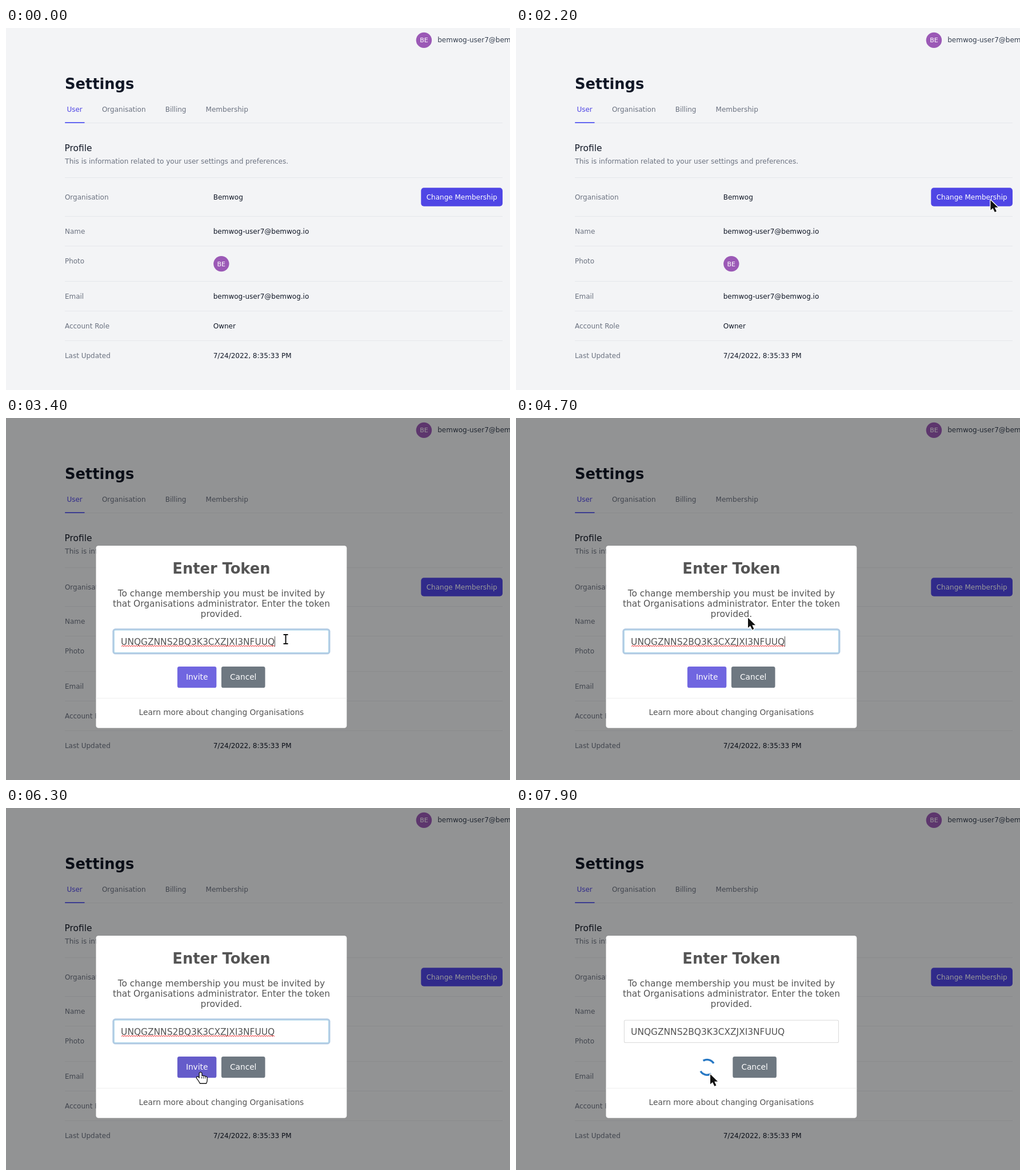
Recreate the animation shown at these times as an HTML page with a canvas. Size 882x635 px, loop 8 s.

```html
<!DOCTYPE html>
<html lang="en">
<head>
<meta charset="utf-8">
<title>Change membership</title>
<style>
  html, body { margin: 0; width: 100%; height: 100%; overflow: hidden; background: #f3f4f6; }
  canvas { display: block; }
</style>
</head>
<body>
<canvas id="stage" width="882" height="635"></canvas>
<script>
const ctx = document.getElementById('stage').getContext('2d');
const LOOP = 8000, STEP = 100;
const OPEN = 2232, PASTE = 3300, PRESS = 6900, LOADING = 7092;
const EMAIL = 'bemwog-user7@bemwog.io';
const TOKEN = 'UNQGZNNS2BQ3K3CXZJXI3NFUUQ';
const MODAL = { x: 157.5, y: 224, w: 438.8, h: 319.7 };
const CENTER = { x: 376.9, y: 383.9 };
const CHANGE = { x: 726.3, y: 280.3, w: 142.7, h: 32.5 };
const INPUT = { x: 188.9, y: 371.7, w: 376, h: 40.3 };
const INVITE = { x: 299.9, y: 436, w: 68.4, h: 37.3 };
const LAST_LINE = { x: 341, y: 335, w: 60, h: 18 };

// Pointer path: time, x, y
const PATH = [
  [600, 180, 28], [700, 450, 130], [800, 690, 240], [900, 805, 296], [1000, 830, 313.5],
  [1200, 830, 313.5], [1300, 830, 308], [1400, 829, 304], [2000, 829, 304], [2100, 830.5, 302],
  [2300, 830.5, 302], [2400, 815, 305], [2600, 650, 345], [2800, 510, 383], [2900, 493, 388],
  [3100, 489.5, 388], [4200, 489.5, 388], [4300, 486, 387], [4500, 455, 374], [4700, 406, 350.5],
  [4900, 392, 348], [5100, 374.5, 349], [5300, 364, 351], [5400, 364, 351], [5500, 364, 354],
  [5700, 358, 385], [5900, 348, 430], [6100, 342, 458], [6300, 340.5, 464],
  [7000, 340.5, 464], [7100, 340, 467]
];

const clamp = v => Math.min(1, Math.max(0, v));
const mix = (a, b, k) => a + (b - a) * k;
const ease = x => 1 - Math.pow(1 - clamp(x), 2.3);
const inside = (p, r) => p.x >= r.x && p.x <= r.x + r.w && p.y >= r.y && p.y <= r.y + r.h;

function text(str, x, y, size, color, align = 'left', weight = 'normal') {
  ctx.font = `${weight} ${size}px "DejaVu Sans", sans-serif`;
  ctx.textAlign = align;
  ctx.fillStyle = color;
  ctx.fillText(str, x, y);
}

function box(r, radius, color, grow = 0) {
  ctx.beginPath();
  ctx.roundRect(r.x - grow, r.y - grow, r.w + 2 * grow, r.h + 2 * grow, radius + grow);
  ctx.fillStyle = color;
  ctx.fill();
}

function rect(x, y, w, h, color) {
  ctx.fillStyle = color;
  ctx.fillRect(x, y, w, h);
}

function avatar(x, y) {
  ctx.beginPath();
  ctx.arc(x, y, 13.7, 0, 2 * Math.PI);
  ctx.fillStyle = '#9b59b6';
  ctx.fill();
  text('BE', x, y + 4, 11, '#fff', 'center');
}

function pointerAt(t) {
  if (t < PATH[0][0]) return null;
  const next = PATH.findIndex(k => k[0] > t);
  if (next < 0) {
    const end = PATH[PATH.length - 1];
    return { x: end[1], y: end[2] };
  }
  const a = PATH[next - 1], b = PATH[next], k = (t - a[0]) / (b[0] - a[0]);
  return { x: mix(a[1], b[1], k), y: mix(a[2], b[2], k) };
}

function drawPage(hovered) {
  const dark = '#111827', gray = '#6b7280', left = 102.9, column = 362.7;
  rect(0, 0, 882, 635, '#f3f4f6');
  avatar(731.4, 21.4);
  text(EMAIL, 755.2, 25, 12, '#374151');
  text('Settings', left, 107, 25.71, dark, 'left', 'bold');

  rect(103, 166, 766, 1, '#e5e7eb');
  rect(103.2, 165, 34.3, 2, '#6366f1');
  text('User', 106.4, 147, 12, '#4f46e5');
  text('Organisation', 167.9, 147, 12, gray);
  text('Billing', 278.7, 147, 12, gray);
  text('Membership', 349.6, 147, 12, gray);

  text('Profile', left - 0.4, 216, 15.43, dark);
  text('This is information related to your user settings and preferences.', left + 0.4, 238, 12, gray);

  const rows = [
    ['Organisation', 'Bemwog', 262, 301], ['Name', EMAIL, 330, 361], ['Photo', '', 382, 413],
    ['Email', EMAIL, 444, 475], ['Account Role', 'Owner', 496, 527],
    ['Last Updated', '7/24/2022, 8:35:33 PM', 548, 579]
  ];
  for (const [label, value, line, base] of rows) {
    rect(103, line, 766, 1, '#e5e7eb');
    text(label, left, base, 12, gray);
    text(value, column, base, 12, dark);
  }
  avatar(376.8, 413.6);
  box(CHANGE, 5.1, hovered ? '#4338ca' : '#4f46e5');
  text('Change Membership', 797.7, 301, 12, '#fff', 'center');
}

function modalScale(t) {
  const p = (t - OPEN) / 300;
  if (p < 0.45) return mix(0.7, 1.05, ease(p / 0.45));
  if (p < 0.8) return mix(1.05, 0.95, ease((p - 0.45) / 0.35));
  return mix(0.95, 1, ease((p - 0.8) / 0.2));
}

function caretOn(t) {
  return [[2300, 2800], [3300, 3900], [4400, 5000], [5500, 6000]].some(([a, b]) => t >= a && t < b);
}

function drawInput(t) {
  const focus = 1 - clamp((t - LOADING) / 300);
  if (focus > 0) box(INPUT, 2.6, `rgba(100,150,200,${0.5 * focus})`, 2.57);
  const edge = [[217, 180], [217, 219], [217, 237]].map(([a, b]) => mix(a, b, focus));
  box(INPUT, 2.6, `rgb(${edge})`);
  box(INPUT, 2.6, '#fff', -1);

  const start = 201.1;
  if (t >= PASTE) text(TOKEN, start, 397.5, 15.43, '#545454');
  if (t > PASTE && t < LOADING) {
    ctx.beginPath();
    for (let x = 202; x <= 470; x += 2) ctx.lineTo(x, 399.9 + ((x / 2) % 2 ? 0.9 : -0.9));
    ctx.strokeStyle = '#f02020';
    ctx.lineWidth = 1;
    ctx.stroke();
  }
  if (caretOn(t)) rect(t < PASTE ? start : 470, 383, 1, 18, '#545454');
}

function drawLoader(t) {
  const turn = (t - LOADING) / 1500 * 2 * Math.PI;
  ctx.strokeStyle = '#2778c4';
  ctx.lineWidth = 3.43;
  for (const mid of [-Math.PI / 2, Math.PI / 2]) {
    ctx.beginPath();
    ctx.arc(334.5, 454.8, 13.4, turn + mid - Math.PI / 4, turn + mid + Math.PI / 4);
    ctx.stroke();
  }
}

function drawModal(t, hovered) {
  const scale = modalScale(t), ink = '#545454', mid = CENTER.x, loading = t >= LOADING;
  rect(0, 0, 882, 635, `rgba(0,0,0,${0.4 * clamp((t - OPEN) / 66)})`);
  ctx.save();
  ctx.translate(CENTER.x, CENTER.y);
  ctx.scale(scale, scale);
  ctx.translate(-CENTER.x, -CENTER.y);

  box(MODAL, 4.3, '#fff');
  text('Enter Token', mid, 273, 25.71, ink, 'center', 'bold');
  ['To change membership you must be invited by',
   'that Organisations administrator. Enter the token',
   'provided.'].forEach((line, i) => text(line, mid, 313 + 18 * i, 15.43, ink, 'center'));
  drawInput(t);

  if (loading) {
    drawLoader(t);
  } else {
    const pressed = t >= PRESS;
    box(INVITE, 3.4, pressed ? '#5a52b3' : hovered ? '#655cca' : '#7066e0');
    text('Invite', 334.1, 459, 13.71, '#fff', 'center');
  }
  const cancel = { x: loading ? 379.3 : 376.9, y: 436, w: 76.6, h: 37.3 };
  box(cancel, 3.4, '#6e7881');
  text('Cancel', cancel.x + cancel.w / 2, 459, 13.71, '#fff', 'center');

  rect(MODAL.x, 491, MODAL.w, 1, '#eee');
  text('Learn more about changing Organisations', mid, 521, 13.71, ink, 'center');
  ctx.restore();
}

const ARROW = new Path2D('M0 0V17.6L4 14L7.4 21L10.4 19.6L7.2 12.8H13Z');
const BEAM = new Path2D('M-3 -8H3M0 -8V8M-3 8H3');
const HAND = new Path2D('M-1.8 1.4Q0 -1.2 1.8 1.4V6.5Q3.6 5.2 5 7Q7 5.8 8.2 7.8Q10.6 7 11 9.6' +
  'V13Q11 15.5 9.6 18.6H-.6Q-2.4 14.6 -6.4 10Q-7.2 7 -4.2 8.2L-1.8 10.4Z');

function stroke(path, color, width) {
  ctx.strokeStyle = color;
  ctx.lineWidth = width;
  ctx.stroke(path);
}

function drawPointer(p, kind) {
  ctx.save();
  ctx.translate(p.x, p.y);
  ctx.lineJoin = 'round';
  if (kind === 'beam') {
    ctx.lineCap = 'square';
    stroke(BEAM, '#fff', 4);
    stroke(BEAM, '#111', 2);
  } else if (kind === 'hand') {
    stroke(HAND, '#111', 2.6);
    ctx.fillStyle = '#fff';
    ctx.fill(HAND);
    ctx.beginPath();
    for (const x of [2, 5, 8]) {
      ctx.moveTo(x, 7.5);
      ctx.lineTo(x, 10.5);
    }
    ctx.strokeStyle = '#111';
    ctx.lineWidth = 1;
    ctx.stroke();
  } else {
    stroke(ARROW, '#fff', 2.6);
    ctx.fillStyle = '#111';
    ctx.fill(ARROW);
  }
  ctx.restore();
}

function draw(t) {
  const p = pointerAt(t), open = t >= 2200;
  const onChange = !open && p && inside(p, CHANGE);
  const onInvite = open && t < LOADING && inside(p, INVITE);
  const onText = open && (inside(p, INPUT) || inside(p, LAST_LINE));
  drawPage(onChange);
  if (t >= OPEN) drawModal(t, onInvite);
  if (p) drawPointer(p, onChange || onInvite ? 'hand' : onText ? 'beam' : 'arrow');
}

const began = performance.now();
function tick() {
  const t = (performance.now() - began) % LOOP;
  draw(Math.floor(t / STEP) * STEP);
  requestAnimationFrame(tick);
}
tick();
</script>
</body>
</html>
```
